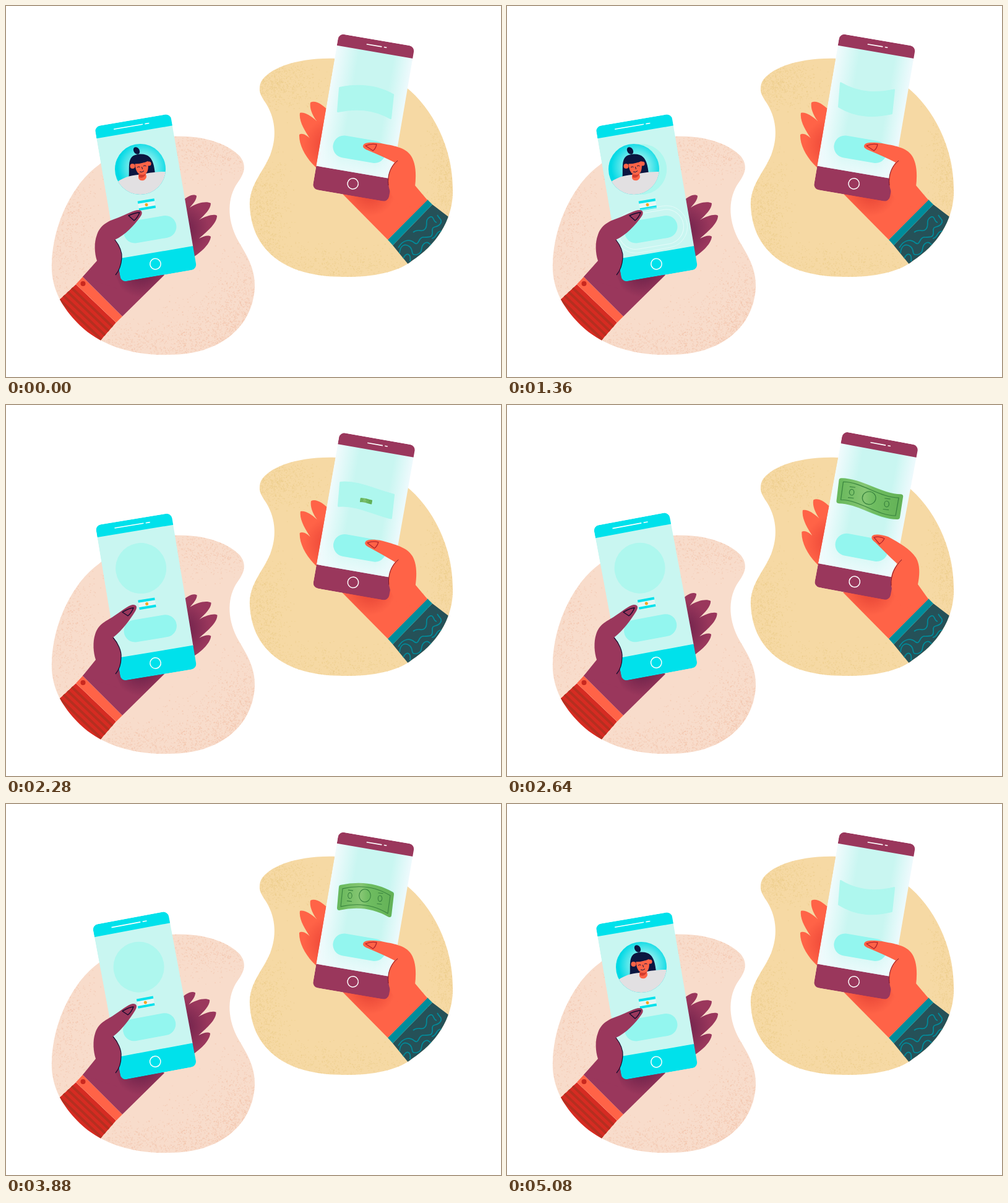
Animation of 800x600 px, one loop 5.12 s. Source, as an HTML page with a canvas:

```html
<!DOCTYPE html>
<html lang="en">
<head>
<meta charset="utf-8">
<title>Phone transfer</title>
<style>
  html, body { margin: 0; width: 100%; height: 100%; overflow: hidden; background: #fff; }
  canvas, svg { position: absolute; left: 0; top: 0; width: 800px; height: 600px; }
</style>
</head>
<body>
<canvas id="ground" width="800" height="600"></canvas>
<svg viewBox="0 0 800 600" id="stage"></svg>
<script>
const LOOP = 5120, STEP = 40;
const C = { cyan: '#00e1eb', plum: '#9a375c', coral: '#ff6347', screen: '#c9f6f1',
  ghost: '#aef7ee', pill: '#93f6ef', navy: '#0b1640', teal: '#008c9b' };

const blobs = [
  { id: 'pinkBlob', fill: '#f8dccb', dot: '#f3bfa5',
    d: 'M270 211C320 208 361 224 378 243C392 262 382 275 371 291C357 316 358 349 376 381C390 405 403 425 402 456C398 520 345 564 265 564C200 566 150 546 120 517C87 485 72 452 74 415C76 350 110 285 150 257C185 225 225 212 270 211Z',
    spots: [[390, 490, 28, 50], [350, 525, 50, 32], [95, 350, 28, 80], [330, 235, 70, 22], [210, 550, 90, 18]] },
  { id: 'sandBlob', fill: '#f6d9a4', dot: '#ebcb86',
    d: 'M533 85C470 83 424 101 412 123C406 140 414 147 421 159C437 186 437 215 427 241C415 270 392 290 394 325C398 395 450 438 545 438C602 439 638 427 656 412C695 387 724 345 722 295C722 230 690 165 645 130C610 100 570 85 533 85Z',
    spots: [[430, 125, 40, 22], [415, 335, 22, 60], [510, 425, 90, 20], [715, 260, 18, 65]] }
];

function paintGround() {
  const ctx = document.getElementById('ground').getContext('2d');
  let seed = 7;
  const rnd = () => (seed = (seed * 16807) % 2147483647) / 2147483647;
  const bell = () => rnd() + rnd() + rnd() + rnd() - 2;
  for (const b of blobs) {
    const shape = new Path2D(b.d);
    ctx.save();
    ctx.fillStyle = b.fill;
    ctx.fill(shape);
    ctx.clip(shape);
    ctx.fillStyle = b.dot;
    ctx.globalAlpha = 0.5;
    for (const [x, y, sx, sy] of b.spots)
      for (let i = 0; i < 1100; i++) {
        const r = 0.8 + rnd();
        ctx.fillRect(x + bell() * sx * 1.6, y + bell() * sy * 1.6, r, r);
      }
    ctx.restore();
  }
}

const line = (d, color, width, extra = '') =>
  `<path d="${d}" fill="none" stroke="${color}" stroke-width="${width}" ${extra}/>`;
const fill = (d, color) => `<path d="${d}" fill="${color}"/>`;

function phone({ at, angle, body, screen, slot, mid, inner }) {
  const [a, b, c] = slot;
  return `<g transform="translate(${at}) rotate(${angle})"><g clip-path="url(#phoneClip)">
    <rect y="19" width="125" height="199" fill="${screen}"/>
    <rect width="125" height="19.6" fill="${body}"/>
    <rect y="217.2" width="125" height="38" fill="${body}"/>
    ${line(`M${a} 9.4H${b}M${b + 3.5} 9.4H${c}`, '#fff', 1.6)}
    <circle cx="${mid - 0.4}" cy="235.6" r="8.7" fill="none" stroke="#fff" stroke-width="1.5"/>
    ${inner}
    <rect x="${mid - 42.5}" y="161" width="86" height="36" rx="18" fill="${C.pill}"/>
  </g></g>`;
}

const radial = (id, x, y, r, from, to) =>
  `<radialGradient id="${id}" gradientUnits="userSpaceOnUse" cx="${x}" cy="${y}" r="${r}">
    <stop offset=".35" stop-color="${from}"/><stop offset="1" stop-color="${to}"/></radialGradient>`;

const sleeve = 'M113 450L178 512L151 543L110 560L60 500L83 478Z';
const stripes = [9, 18, 27, 36]
  .map(o => `M${98 - o * 0.7} ${435.7 + o * 0.72}l100 95.4`).join('');

const defs = `<defs>
  ${blobs.map(b => `<clipPath id="${b.id}"><path d="${b.d}"/></clipPath>`).join('')}
  <clipPath id="sleeveClip"><path d="${sleeve}"/></clipPath>
  <clipPath id="phoneClip"><rect width="124.3" height="255.2" rx="9"/></clipPath>
  <clipPath id="screenClip"><rect y="19.6" width="124.3" height="197.6"/></clipPath>
  <clipPath id="faceClip"><circle r="41"/></clipPath>
  ${radial('plumPalm', 218, 425, 46, '#76264d', C.plum)}
  ${radial('plumFingers', 285, 362, 44, '#7b2850', C.plum)}
  ${radial('coralPalm', 588, 298, 42, '#ec4c3a', C.coral)}
  ${radial('coralFingers', 525, 225, 44, '#f04c3a', C.coral)}
  ${radial('portrait', 4, -4, 41, '#9cf1ef', '#00d9e5')}
  <linearGradient id="glow">
    <stop stop-color="#f1fbfd"/><stop offset=".3" stop-color="${C.screen}"/>
    <stop offset=".75" stop-color="${C.screen}"/><stop offset="1" stop-color="#effafd"/>
  </linearGradient>
  <linearGradient id="floor" x2="0" y2="1">
    <stop offset=".75" stop-color="#f1fbfd" stop-opacity="0"/><stop offset="1" stop-color="#f1fbfd" stop-opacity=".8"/>
  </linearGradient>
  <linearGradient id="cash">
    <stop stop-color="#69b85c"/><stop offset=".42" stop-color="#86c673"/>
    <stop offset=".55" stop-color="#6fbd61"/><stop offset="1" stop-color="#64b257"/>
  </linearGradient>
</defs>`;

const leftSide = `
  <g clip-path="url(#pinkBlob)">
    <g clip-path="url(#sleeveClip)">
      ${fill(sleeve, '#d62b22')}
      ${line(stripes, '#b52f20', 4)}
    </g>
    ${fill('M124 438L188 502L178 512L113 450Z', C.coral)}
    <circle cx="124.5" cy="449" r="4" fill="#c9281f"/>
  </g>
  ${fill('M124 438L150 410L190 395L256 435L188 502Z', 'url(#plumPalm)')}
  <g id="left">
    ${fill('M284 316C293 308 302 303 308 307C308 314 302 320 297 326C309 318 324 315 331 319C331 328 321 338 312 346C324 339 336 336 341 339C341 351 327 363 312 376C320 372 327 370 331 373C330 384 317 397 303 406L279 408Z', 'url(#plumFingers)')}
    ${phone({ at: '143 195', angle: -9.7, body: C.cyan, screen: C.screen, slot: [30, 77.5, 88], mid: 60, inner: `
      <circle cx="61.500" cy="80.5" r="41" fill="${C.ghost}"/>
      <rect x="48.3" y="134" width="27.2" height="9" fill="#e6f7f5"/>
      ${line('M48.3 132.8H75.5M48.3 144.3H75.5', C.cyan, 4)}
      <circle cx="61.5" cy="138.8" r="2.5" fill="#f6a51e"/>
      <g clip-path="url(#screenClip)" fill="none" stroke="#ecfdfb" id="ripples"><rect/><rect/></g>` })}
  </g>
  <path id="leftThumb" fill="${C.plum}"/>
  <path id="leftCrease" fill="none" stroke="#150b2e" stroke-width="1.2"/>
  <path id="leftNail" fill="none" stroke="#150b2e" stroke-width="1.4" stroke-linejoin="round"/>`;

const rightSide = `
  <g clip-path="url(#sandBlob)">
    ${fill('M625 387L689 321L740 360L660 430Z', '#255158')}
    ${line('M636 400C637 386 645 384 652 389C660 395 652 404 664 402C676 398 668 390 676 384C686 378 684 392 692 384M634 391C642 377 653 377 660 383C668 389 666 373 675 374C686 374 690 374 689 364C688 354 697 360 702 352C706 346 700 344 697 338M658 366C666 359 672 367 677 361C683 355 676 347 684 342C692 337 690 350 696 350M642 408C648 397 655 401 653 413M704 364C694 364 697 375 688 376', C.teal, 1.7)}
    ${fill('M617 378L681 313L689 321L625 387Z', C.teal)}
  </g>
  ${fill('M543 303L617 378L681 314L655 283L610 270Z', 'url(#coralPalm)')}
  <g id="right">
    ${fill('M520 168C510 158 499 152 492 156C490 166 496 178 502 186C492 177 482 171 475 173C473 186 483 202 491 214C485 208 478 205 474 208C473 224 484 246 502 262L540 262Z', 'url(#coralFingers)')}
    ${phone({ at: '538 44.5', angle: 9.7, body: C.plum, screen: 'url(#glow)', slot: [47, 72, 80], mid: 63.6,
      inner: '<rect y="19.6" width="125" height="197.6" fill="url(#floor)"/>' })}
    <path id="ghostBill" fill="${C.ghost}" transform="translate(581 156)" stroke="${C.ghost}" stroke-width="3" stroke-linejoin="round"/>
    <g id="bill" stroke-linejoin="round">
      <path id="billBody" fill="url(#cash)" stroke="url(#cash)" stroke-width="7"/>
      <path id="billArt" fill="none" stroke="#39843f" stroke-width="1.1"/>
    </g>
  </g>
  <path id="rightThumb" fill="${C.coral}"/>
  <path id="rightCrease" fill="none" stroke="#7d1528" stroke-width="1"/>
  <path id="rightNail" fill="none" stroke="#b3222a" stroke-width="1.3" stroke-linejoin="round"/>`;

const avatar = `<g id="avatar">
  <circle r="41" fill="url(#portrait)"/>
  <circle r="41" fill="${C.cyan}" id="disc"/>
  <circle fill="${C.pill}" id="core"/>
  <g clip-path="url(#faceClip)"><g id="face">
    <ellipse cx="-6" cy="-30" rx="4.6" ry="6.3" transform="rotate(-35 -6 -30)" fill="${C.navy}"/>
    ${fill('M-19 15C-16 2 -24 -22 -4 -24C18 -27 22 -12 24 8C12 14 -6 16 -19 15Z', C.navy)}
    ${fill('M-38 21C-24 11 -10 9 0 9C15 5 30 4 42 4L42 50L-42 50Z', '#e2e0e2')}
    ${fill('M-3 8L9 7L10 12C9 20 -2 20 -3 14Z', C.coral)}
    ${fill('M-2 9L9 7C8 12 3 15 -2 13Z', '#d23c2e')}
    <circle cx="-12.5" cy="-5" r="4" fill="${C.coral}"/><circle cx="14" cy="-9" r="3.6" fill="${C.coral}"/>
    ${fill('M-9 -13L12 -16C14 -2 13 8 4 9C-5 9 -8 2 -9 -13Z', C.coral)}
    ${fill('M-12 -9L-9 -19L12 -21L14 -14C6 -10 -3 -8 -12 -9Z', C.navy)}
    ${line('M-5 -3q2.5 -2 4.5 -.5M5 -5q2.5 -2 4.5 0M2.5 -4l1 4M-1 4q4 2 7 -1.5', C.navy, 1)}
  </g></g>
</g>`;

document.getElementById('stage').innerHTML = defs + leftSide + rightSide + avatar;
const el = Object.fromEntries([...document.querySelectorAll('#stage [id]')].map(n => [n.id, n]));
const set = (node, attrs) => { for (const k in attrs) node.setAttribute(k, attrs[k]); };

const leftPoses = {
  thumb: {
    press: 'M124 438L147 412C143 400 142 383 147 370C153 352 168 347 182 342C195 337 206 330 214 330C221 330 221 336 217 341C208 354 192 371 176 378C183 387 188 398 187 408C186 420 183 428 177 435L188 460Z',
    mid: 'M124 438L145 412C141 400 140 383 144 371C149 355 159 351 172 343C186 334 197 324 205 323C213 323 212 329 208 335C201 346 188 365 173 376C181 385 187 398 186 408C186 420 183 428 177 435L188 460Z',
    up: 'M124 438L144 413C136 400 136 382 138 368C140 350 141 338 144 325C145 319 148 314 152 314C156 315 158 318 160 322C165 334 168 350 165 369C179 375 188 395 187 408C186 420 183 428 177 435L188 460Z'
  },
  crease: {
    press: 'M176 378C183 387 188 398 187 408C186 420 183 428 177 435',
    mid: 'M173 376C181 385 187 398 186 408C186 420 183 428 177 435',
    up: 'M165 369C179 375 188 395 187 408C186 420 183 428 177 435'
  },
  nail: {
    press: 'M198 339C205 336 211 334 216 334C214 339 211 344 207 347Z',
    mid: 'M188 335C195 331 200 328 206 328C204 333 201 338 197 341Z',
    up: 'M146 335C146 327 148 320 151 318C154 321 156 327 157 332Z'
  }
};
const rightPoses = {
  thumb: {
    rest: 'M681 314L661 292C663 275 663 256 655 243C646 228 625 226 606 222C592 220 581 220 578 224C575 228 579 231 584 233C600 240 615 246 628 253C617 266 614 285 623 306L640 330Z',
    lift: 'M681 314L664 290C667 275 668 259 661 247C652 233 634 223 616 213C604 209 593 208 590 212C588 216 591 219 595 222C606 233 619 246 631 257C620 270 617 287 625 306L640 330Z'
  },
  crease: { rest: 'M633 250C622 259 616 272 618 290', lift: 'M638 250C626 262 620 275 621 292' },
  nail: { rest: 'M581 226C588 223 594 223 599 224C598 228 596 232 593 234Z', lift: 'M593 214C600 212 605 213 610 216C608 220 605 223 602 225Z' }
};

const lerp = (a, b, k) => a + (b - a) * k;
const ease = k => k * k * (3 - 2 * k);
function mix(a, b, k) {
  const to = b.match(/[\d.]+/g);
  let i = 0;
  return a.replace(/[\d.]+/g, n => lerp(+n, +to[i++], k).toFixed(2));
}
// Steps are [time, value] pairs, eased between neighbours.
function track(t, steps) {
  const i = steps.findIndex(s => s[0] > t);
  if (i < 0) return steps[steps.length - 1][1];
  if (!i) return steps[0][1];
  const [t0, v0] = steps[i - 1], [t1, v1] = steps[i];
  return lerp(v0, v1, ease((t - t0) / (t1 - t0)));
}
function turn([x, y], [px, py], degrees) {
  const a = degrees * Math.PI / 180, c = Math.cos(a), s = Math.sin(a);
  return [px + (x - px) * c - (y - py) * s, py + (x - px) * s + (y - py) * c];
}

const T = {
  leftTilt: [[40, 0], [560, -0.9], [960, -0.9], [1240, 0], [1560, 0], [1840, 1.3], [2040, 1.3], [2560, -0.9], [4200, -0.9], [4840, 0]],
  up: [[160, 0], [640, 1], [920, 1], [1240, 0]],
  mid: [[1540, 0], [1840, 1], [4200, 1], [4840, 0]],
  shift: [[1200, 0], [1360, -12], [1480, -14]],
  face: [[1440, 1], [1640, 0], [4279, 0], [4280, 1]],
  size: [[1480, 1], [1720, 0.695], [2140, 0.695], [2280, 0], [4280, 0], [4560, 1.1], [4760, 1]],
  flight: [[1640, 0], [2232, 1]],
  rightTilt: [[2160, 0], [2480, 0.9], [2760, 0.9], [3480, 0]],
  lift: [[2160, 0], [2520, 1], [2760, 1], [3480, 0]],
  billX: [[2200, 0], [2500, 1.24], [2640, 1.17], [2960, 0.97], [3200, 1], [4040, 1], [4220, 1.25], [4400, 0]],
  billY: [[2200, 0], [2500, 0.95], [2640, 1], [2960, 1.02], [3200, 1], [4040, 1], [4220, 1], [4400, 0]]
};

// Heights of the four control points along the upper edge of the note.
const waves = [[-25, -31, -30, -14], [-36, -37, -11, -11], [-33, -15, -15, -22]];
function waveAt(t) {
  const p = (t % 1920) / 640, i = Math.floor(p);
  const next = waves[(i + 1) % 3];
  return waves[i].map((y, j) => lerp(y, next[j], ease(p - i)));
}
function notePath(w, inset) {
  const l = -41.5 + inset, r = 44.5 - inset, third = (r - l) / 3, h = 38 - inset;
  const [a, b, c, d] = w.map(y => y + 1.5);
  return `M${l} ${a + inset}C${l + third} ${b + inset} ${r - third} ${c + inset} ${r} ${d + inset}` +
    `L${r - 4} ${d + h}C${r - third - 4} ${c + h} ${l + third - 3} ${b + h} ${l - 3} ${a + h}Z`;
}
function noteArt(w) {
  const mid = u => {
    const v = 1 - u;
    return 20 + v * v * v * w[0] + 3 * v * v * u * w[1] + 3 * v * u * u * w[2] + u * u * u * w[3];
  };
  const oval = (x, y, rx, ry) => `M${x - rx} ${y}a${rx} ${ry} 0 1 1 ${2 * rx} 0a${rx} ${ry} 0 1 1 ${-2 * rx} 0`;
  const side = u => {
    const x = -44 + 90 * u, y = mid(u);
    return oval(x, y, 3.2, 4.8) + `M${x - 3} ${y - 9}l8 1M${x - 5} ${y + 8.5}l8 1`;
  };
  return notePath(w, 4.5) + oval(-1, mid(0.48), 9.3, 10.4) + side(0.21) + side(0.75);
}

function draw(t) {
  const at = Object.fromEntries(Object.entries(T).map(([k, steps]) => [k, track(t, steps)]));

  set(el.left, { transform: `rotate(${at.leftTilt} 200 430)` });
  set(el.right, { transform: `rotate(${at.rightTilt} 660 360)` });
  for (const part of ['thumb', 'crease', 'nail']) {
    const suffix = part[0].toUpperCase() + part.slice(1);
    const l = leftPoses[part], r = rightPoses[part];
    set(el['left' + suffix], { d: mix(mix(l.press, l.mid, at.mid), l.up, at.up) });
    set(el['right' + suffix], { d: mix(r.rest, r.lift, at.lift) });
  }

  [...el.ripples.children].forEach((ring, i) => {
    const k = (t - 1200 - i * 60) / 340, o = 34 * k;
    const on = k > 0 && k < 1;
    set(ring, { opacity: on ? 1 - k * 0.7 : 0 });
    if (on) set(ring, { x: 17.5 - o, y: 161 - o, width: 86 + 2 * o, height: 36 + 2 * o, rx: 18 + o });
  });

  const w = waveAt(t);
  set(el.ghostBill, { d: notePath(w, 0) });
  set(el.billBody, { d: notePath(w, 2) });
  set(el.billArt, { d: noteArt(w) });
  set(el.bill, { transform: `translate(${581 + 12 * Math.max(0, at.billX - 1)} 156) scale(${at.billX} ${at.billY})` });

  const back = t > 3000;
  const home = turn([217 + (back ? 0 : at.shift), 264], [200, 430], at.leftTilt);
  const f = back ? 0 : at.flight;
  const x = lerp(home[0], 581, f), y = lerp(home[1], 156, f) - 100 * f * (1 - f);
  set(el.avatar, { transform: `translate(${x} ${y}) rotate(${at.leftTilt}) scale(${at.size})` });
  set(el.face, { transform: `scale(${at.face})` });
  set(el.disc, { opacity: 1 - at.face });
  set(el.core, { r: 21.6 * (1 - at.face) });
}

paintGround();
const start = performance.now();
function tick() {
  const t = (performance.now() - start) % LOOP;
  draw(Math.floor(t / STEP) * STEP);
  requestAnimationFrame(tick);
}
tick();
</script>
</body>
</html>
```
